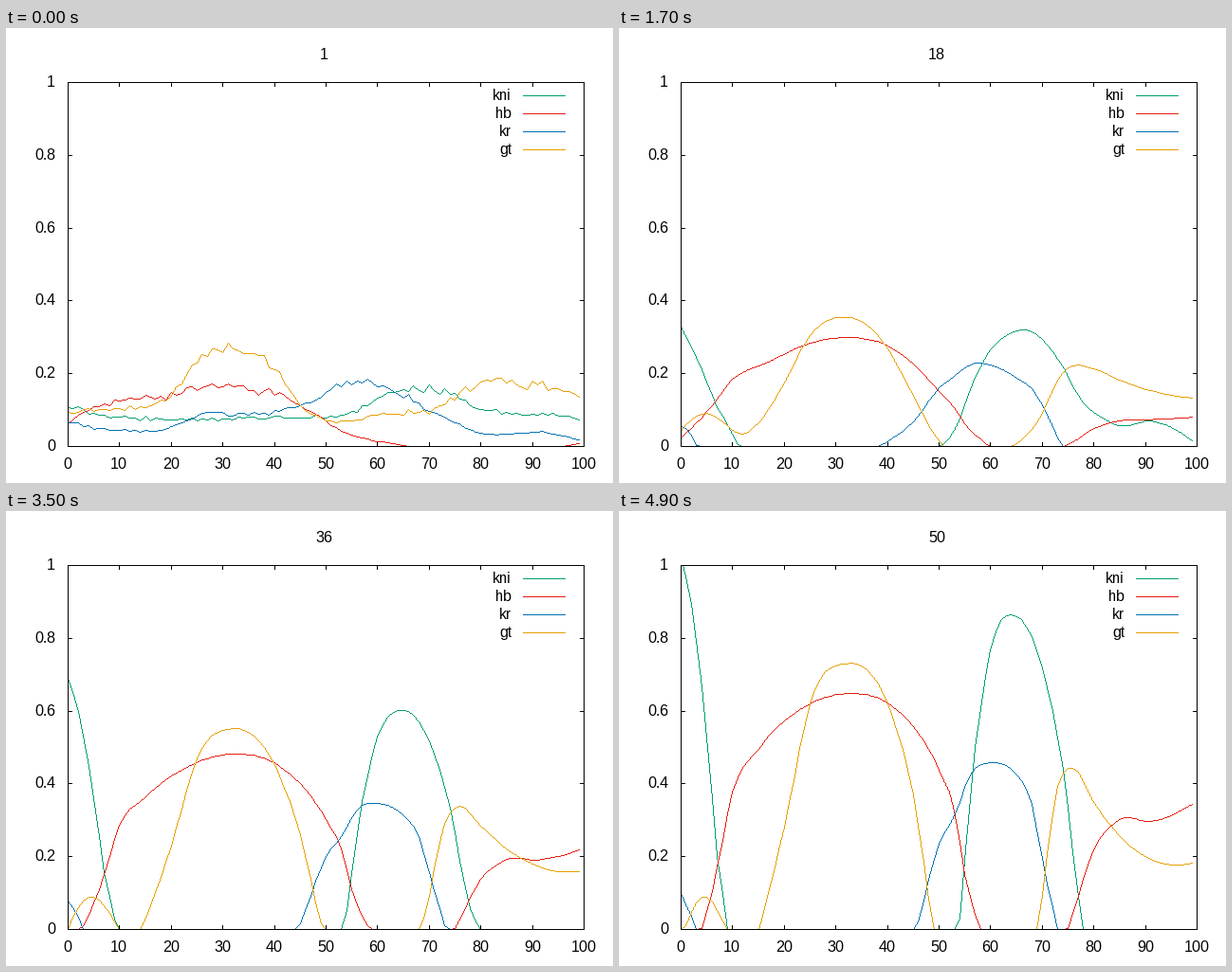
Recreate the animation shown at these times as a matplotlib script. Size 640x480 px, loop 5000 ms.

```python
import matplotlib.pyplot as plt
import numpy as np
from matplotlib.animation import FuncAnimation

W, H, DPI = 640, 480, 80
LEFT, RIGHT, TOP, BOTTOM = 65, 609, 57, 441
STEPS, SETTLED = 50, 11
CELLS = np.arange(100)

# Native hinting gives whole-pixel letter spacing
plt.rcParams.update({"text.hinting": "default", "text.hinting_factor": 1})


def curve(*points):
    """Smooth curve over all cells through (cell, level) points."""
    x, y = np.array(points, float).T
    m = np.gradient(y, x, edge_order=2)
    i = np.clip(np.searchsorted(x, CELLS, side="right") - 1, 0, len(x) - 2)
    h = x[i + 1] - x[i]
    t = (CELLS - x[i]) / h
    return ((1 + 2 * t) * (1 - t) ** 2 * y[i] + t * (1 - t) ** 2 * h * m[i]
            + t * t * (3 - 2 * t) * y[i + 1] + t * t * (t - 1) * h * m[i + 1])


def mix(a, b, t):
    return a + (b - a) * t


class Gene:
    """Noisy start, settled profile and final profile; levels below zero are cut off."""

    def __init__(self, name, color, start, settled, final):
        self.name, self.color = name, color
        self.start, self.settled, self.final = start, settled, final
        self.noise = .04 * start * rng.standard_normal(len(CELLS))

    def level(self, step):
        if step < SETTLED:
            noise = self.noise
            for _ in range(2 * (step - 1)):
                noise = np.convolve(noise, [.25, .5, .25], mode="same")
            level = mix(self.start, self.settled, (step - 1) / (SETTLED - 1)) + noise
        else:
            s = (step - SETTLED) / (STEPS - SETTLED)
            level = mix(self.settled, self.final, s * (.8 + .2 * s))
        return np.maximum(level, 0)


rng = np.random.default_rng(4)
GENES = [
    Gene("kni", (0, 158, 115),
         curve((0, .11), (8, .083), (20, .075), (40, .08), (53, .086), (66, .157),
               (74, .145), (82, .096), (92, .09), (99, .073)),
         curve((0, .205), (5, .115), (11, .053), (19, 0), (33, -.02), (46, -.005), (50, .028),
               (60, .177), (67, .229), (78, .14), (86, .091), (91, .103), (99, .062)),
         curve((0, 1.02), (2, .893), (5, .525), (7, .2), (9, 0), (11, -.26), (30, -.4),
               (50, -.2), (53, -.09), (57, .5), (60, .768), (65, .86), (70, .72),
               (74, .44), (78, 0), (82, -.12), (91, -.12), (99, -.25))),
    Gene("hb", (229, 30, 16),
         curve((0, .062), (5, .105), (10, .125), (19, .138), (30, .163), (40, .147),
               (46, .105), (54, .036), (63, .008), (99, .008)),
         curve((0, .046), (4, .093), (10, .15), (17, .18), (25, .224), (32, .238), (40, .215),
               (45, .168), (50, .102), (57, .03), (64, -.002), (72, 0), (85, .029), (99, .033)),
         curve((0, -.1), (4, .002), (6, .105), (10, .378), (15, .495), (25, .62), (33, .648),
               (40, .622), (50, .437), (53, .325), (55, .15), (58, 0), (65, -.2),
               (75, .003), (80, .22), (85, .302), (91, .297), (99, .345))),
    Gene("kr", (0, 114, 178),
         curve((0, .067), (10, .045), (20, .05), (26, .092), (33, .087), (45, .11),
               (56, .175), (60, .167), (70, .1), (80, .037), (92, .037), (99, .018)),
         curve((0, .048), (2, .03), (3, .003), (14, -.06), (23, -.002), (27, .026), (31, .018),
               (40, .055), (45, .085), (50, .147), (57, .19), (65, .147), (70, .1),
               (74, .005), (76, -.03), (99, -.05)),
         curve((0, .1), (3, 0), (6, -.12), (27, -.4), (40, -.22), (45, -.03), (50, .235),
               (53, .312), (56, .425), (60, .458), (65, .425), (68, .345), (70, .195),
               (73, 0), (80, -.2), (99, -.4))),
    Gene("gt", (230, 159, 0),
         curve((0, .095), (10, .105), (16, .115), (20, .14), (25, .235), (32, .268), (36, .255),
               (40, .215), (45, .11), (52, .068), (60, .088), (70, .1), (81, .183),
               (90, .173), (99, .14)),
         curve((0, .057), (4, .09), (11, .062), (15, .077), (20, .155), (24, .235), (31, .289),
               (36, .267), (40, .207), (45, .1), (52, .012), (62, .023), (70, .09),
               (75, .175), (80, .189), (86, .164), (99, .125)),
         curve((0, -.04), (4, .088), (9, -.01), (12, -.13), (15, -.002), (20, .28), (25, .62),
               (32, .73), (40, .62), (45, .37), (49, 0), (55, -.25), (62, -.22), (69, 0),
               (73, .393), (76, .443), (80, .348), (86, .243), (99, .182))),
]


def to_x(cell):
    return np.rint(LEFT + (RIGHT - LEFT) * cell / 100).astype(int)


def to_y(value):
    return np.rint(BOTTOM - (BOTTOM - TOP) * value).astype(int)


def draw_polyline(canvas, xs, ys, color):
    """Hard-edged line, one pixel wide."""
    for x0, y0, x1, y1 in zip(xs, ys, xs[1:], ys[1:]):
        n = max(abs(x1 - x0), abs(y1 - y0)) + 1
        px = np.rint(np.linspace(x0, x1, n)).astype(int)
        py = np.rint(np.linspace(y0, y1, n)).astype(int)
        inside = py >= TOP
        canvas[py[inside], px[inside]] = color


def draw_frame_box(canvas):
    canvas[[TOP, BOTTOM], LEFT:RIGHT + 1] = 0
    canvas[TOP:BOTTOM + 1, [LEFT, RIGHT]] = 0
    for x in to_x(np.arange(0, 101, 10)):
        canvas[TOP:TOP + 5, x] = 0
        canvas[BOTTOM - 4:BOTTOM + 1, x] = 0
    for y in to_y(np.arange(6) / 5):
        canvas[y, LEFT:LEFT + 5] = 0
        canvas[y, RIGHT - 4:RIGHT + 1] = 0


def render(step):
    canvas = np.full((H, W, 3), 255, np.uint8)
    for row, gene in enumerate(GENES):
        canvas[71 + 19 * row, 545:590] = gene.color
        draw_polyline(canvas, to_x(CELLS), to_y(gene.level(step)), gene.color)
    draw_frame_box(canvas)
    return canvas


def label(x, baseline, text, align):
    return fig.text(x / W, 1 - baseline / H, text, ha=align, va="baseline",
                    fontsize=16 * 72 / DPI, family="Liberation Sans", color="black")


fig = plt.figure(figsize=(W / DPI, H / DPI), dpi=DPI, facecolor="white")
picture = fig.figimage(render(1), origin="upper")
title = label(335, 33, "1", "center")
for cell in range(0, 101, 10):
    label(to_x(cell), 465, str(cell), "center")
for k in range(6):
    label(52, to_y(k / 5) + 5, f"{k / 5:g}", "right")
for row, gene in enumerate(GENES):
    label(533, 76 + 19 * row, gene.name, "right")


def update(i):
    picture.set_data(render(i + 1))
    title.set_text(str(i + 1))
    return picture, title


anim = FuncAnimation(fig, update, frames=STEPS, interval=100, repeat=True, repeat_delay=0)
plt.show()
```
